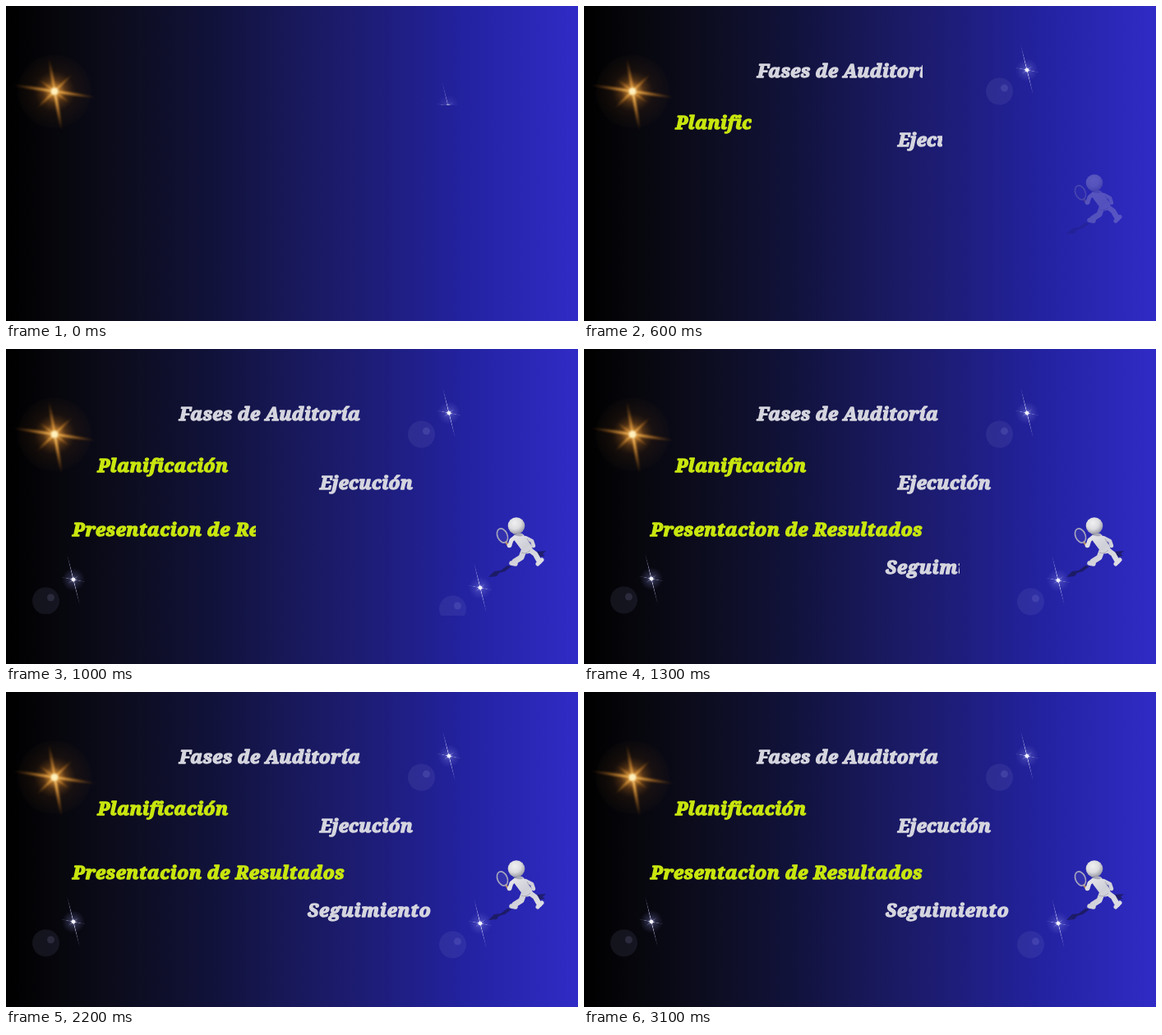
Recreate the animation shown at these times as an HTML page without scripts. Size 696x384 px, loop 5 s.

```html
<!DOCTYPE html>
<html lang="es">
<head>
<meta charset="utf-8">
<title>Fases de Auditoría</title>
<style>
  html, body { margin: 0; width: 100%; height: 100%; overflow: hidden; background: #000; }
  svg { display: block; width: 100vw; height: 100vh; }
  text {
    font: italic 700 22.5px "Noto Serif", "Liberation Serif", serif;
    stroke-width: 1.5; stroke-linejoin: round;
  }
  .pale { fill: #d5d5df; stroke: #d5d5df; }
  .lime { fill: #c9e60f; stroke: #c9e60f; }
  .limb { fill: none; stroke: url(#skin); stroke-linecap: round; stroke-linejoin: round; }
</style>
</head>
<body>
<svg viewBox="0 0 696 384" preserveAspectRatio="none">
  <defs>
    <linearGradient id="night">
      <stop offset="0" stop-color="#000"/>
      <stop offset=".1" stop-color="#07070e"/>
      <stop offset=".22" stop-color="#0d0d21"/>
      <stop offset=".36" stop-color="#11123a"/>
      <stop offset=".5" stop-color="#18185a"/>
      <stop offset=".65" stop-color="#1e1d7a"/>
      <stop offset=".8" stop-color="#2322a0"/>
      <stop offset="1" stop-color="#302bc6"/>
    </linearGradient>
    <radialGradient id="gold">
      <stop offset="0" stop-color="#ffe9a8"/>
      <stop offset=".2" stop-color="#f5b650" stop-opacity=".95"/>
      <stop offset=".55" stop-color="#b87426" stop-opacity=".65"/>
      <stop offset="1" stop-color="#6a3c10" stop-opacity="0"/>
    </radialGradient>
    <radialGradient id="goldGlow">
      <stop offset="0" stop-color="#ffce70"/>
      <stop offset=".12" stop-color="#e89a3c" stop-opacity=".8"/>
      <stop offset=".3" stop-color="#a8641f" stop-opacity=".45"/>
      <stop offset=".55" stop-color="#5c3614" stop-opacity=".2"/>
      <stop offset=".93" stop-color="#3c2614" stop-opacity=".1"/>
      <stop offset="1" stop-color="#3c2614" stop-opacity="0"/>
    </radialGradient>
    <radialGradient id="halo">
      <stop offset="0" stop-color="#d8dcff" stop-opacity=".6"/>
      <stop offset=".35" stop-color="#9a9cf0" stop-opacity=".22"/>
      <stop offset="1" stop-color="#8888e0" stop-opacity="0"/>
    </radialGradient>
    <radialGradient id="beam">
      <stop offset="0" stop-color="#fff"/>
      <stop offset=".4" stop-color="#dcdcff" stop-opacity=".55"/>
      <stop offset="1" stop-color="#b8b8f0" stop-opacity=".1"/>
    </radialGradient>
    <radialGradient id="ball" cx=".4" cy=".33" r=".68">
      <stop offset="0" stop-color="#f0f0f2"/>
      <stop offset=".55" stop-color="#dcdce0"/>
      <stop offset="1" stop-color="#9898a6"/>
    </radialGradient>
    <linearGradient id="skin" gradientUnits="userSpaceOnUse" x1="612" y1="230" x2="640" y2="262">
      <stop offset="0" stop-color="#e6e6ea"/>
      <stop offset=".5" stop-color="#cfcfd8"/>
      <stop offset="1" stop-color="#dcdce2"/>
    </linearGradient>
    <filter id="soft" x="-50%" y="-50%" width="200%" height="200%"><feGaussianBlur stdDeviation=".9"/></filter>

    <g id="flare">
      <circle cx="-33.5" cy="26" r="16.5" fill="#9a98d8" opacity=".1"/>
      <circle cx="-27.5" cy="22" r="4.5" fill="#b0b0f0" opacity=".14"/>
      <circle r="14" fill="url(#halo)"/>
      <g fill="url(#beam)">
        <ellipse rx="31" ry=".7" transform="rotate(76)"/>
        <ellipse rx="15" ry=".55" transform="rotate(11)"/>
        <ellipse rx="8" ry=".5" transform="rotate(-38)"/>
      </g>
      <circle r="2.3" fill="#f4f4ff"/>
    </g>
    <clipPath id="tray"><rect x="-60" y="-40" width="100" height="83"/></clipPath>

    <!-- left-to-right text wipes -->
    <clipPath id="wipe1"><rect x="205" y="60" width="0" height="40">
      <animate attributeName="width" dur="5s" repeatCount="indefinite" calcMode="discrete"
        keyTimes="0;.04;.06;.08;.1;.12;.14" values="0;33;76;120;163;207;260"/>
    </rect></clipPath>
    <clipPath id="wipe2"><rect x="105" y="122" width="0" height="40">
      <animate attributeName="width" dur="5s" repeatCount="indefinite" calcMode="discrete"
        keyTimes="0;.08;.1;.12;.14;.16" values="0;36;68;99;131;200"/>
    </rect></clipPath>
    <clipPath id="wipe3"><rect x="376" y="143" width="0" height="40">
      <animate attributeName="width" dur="5s" repeatCount="indefinite" calcMode="discrete"
        keyTimes="0;.1;.12;.14;.16;.18" values="0;32;60;88;115;160"/>
    </rect></clipPath>
    <clipPath id="wipe4"><rect x="75" y="200" width="0" height="40">
      <animate attributeName="width" dur="5s" repeatCount="indefinite" calcMode="discrete"
        keyTimes="0;.14;.16;.18;.2;.22;.24" values="0;32;98;163;229;295;370"/>
    </rect></clipPath>
    <clipPath id="wipe5"><rect x="361" y="246" width="0" height="40">
      <animate attributeName="width" dur="5s" repeatCount="indefinite" calcMode="discrete"
        keyTimes="0;.22;.24;.26;.28;.3" values="0;35;66;96;127;190"/>
    </rect></clipPath>
  </defs>

  <rect width="696" height="384" fill="url(#night)"/>

  <g transform="translate(59 104)">
    <circle r="46" fill="url(#goldGlow)"/>
    <g fill="url(#gold)" filter="url(#soft)">
      <ellipse rx="46" ry="3.2" transform="translate(1 4) rotate(80)"/>
      <ellipse rx="52" ry="3" transform="rotate(8.5)"/>
      <ellipse rx="30" ry="2.8" transform="rotate(-44)"/>
      <ellipse rx="24" ry="2.4" transform="rotate(38)"/>
    </g>
    <circle r="4.5" fill="#fff0bc" filter="url(#soft)"/>
  </g>

  <!-- sparkles rise inside their trays -->
  <g transform="translate(539 78)" clip-path="url(#tray)"><g>
    <animateTransform attributeName="transform" type="translate" dur="5s" repeatCount="indefinite" calcMode="discrete"
      keyTimes="0;.02;.04;.06;.08" values="-1 44;0 25;0 8;0 1;0 0"/>
    <animate attributeName="opacity" dur="5s" repeatCount="indefinite" calcMode="discrete"
      keyTimes="0;.02;.04" values=".6;.85;1"/>
    <use href="#flare"/>
  </g></g>
  <g transform="translate(82 280)" clip-path="url(#tray)"><g>
    <animateTransform attributeName="transform" type="translate" dur="5s" repeatCount="indefinite" calcMode="discrete"
      keyTimes="0;.14;.16;.18;.2;.22" values="0 90;0 46;0 25;0 8;0 1;0 0"/>
    <use href="#flare"/>
  </g></g>
  <g transform="translate(577 282)" clip-path="url(#tray)"><g>
    <animateTransform attributeName="transform" type="translate" dur="5s" repeatCount="indefinite" calcMode="discrete"
      keyTimes="0;.18;.2;.22;.24" values="0 90;0 30;0 9;0 2;0 0"/>
    <use href="#flare"/>
  </g></g>

  <g>
    <animate attributeName="opacity" dur="5s" repeatCount="indefinite" calcMode="discrete"
      keyTimes="0;.12;.14;.16;.18;.2" values="0;.25;.55;.82;.95;1"/>
    <g fill="#1a1850">
      <path d="M587 278L594 271L602 270L610 264L615 265L607 271L600 273L597 277Z" opacity=".75"/>
      <path d="M640 252L646 247L657 246L653 250L656 252L647 254Z" opacity=".7">
        <animate attributeName="opacity" dur="5s" repeatCount="indefinite" calcMode="discrete"
          keyTimes="0;.18;.2" values="0;.4;.7"/>
      </path>
    </g>
    <g class="limb">
      <path d="M636 244L644 250L649 259" stroke-width="6.5"/>
      <path d="M647 262L652 257" stroke-width="5"/>
      <path d="M630 246L627 254L619 259" stroke-width="7"/>
      <path d="M620 262L615 261" stroke-width="5.5"/>
      <path d="M632 230L640 234L642 240" stroke-width="4.5"/>
      <path d="M625 231L634 243" stroke-width="13"/>
      <path d="M620 229L615 233L613 239" stroke-width="5"/>
    </g>
    <path d="M627 248Q633 251 638 245M634 231L638 238" fill="none" stroke="#9898a8" opacity=".7"/>
    <ellipse cx="623" cy="226" rx="6" ry="2" fill="#8e8ea0" opacity=".65" transform="rotate(10 623 226)"/>
    <circle cx="621" cy="215.5" r="10.3" fill="url(#ball)"/>
    <path d="M608 235L612 241" stroke="#b98a5c" stroke-width="2.4" stroke-linecap="round"/>
    <ellipse cx="604" cy="227.5" rx="6" ry="9" transform="rotate(-24 604 227.5)" fill="#4744b0" fill-opacity=".4" stroke="#a6a6bc" stroke-width="1.6"/>
    <circle cx="612.5" cy="239.5" r="2.8" fill="#e0e0e6"/>
  </g>

  <g clip-path="url(#wipe1)"><text class="pale" x="210.8" y="87.3" letter-spacing=".3">Fases de Auditoría</text></g>
  <g clip-path="url(#wipe2)"><text class="lime" x="111.5" y="149.8" letter-spacing=".4">Planificación</text></g>
  <g clip-path="url(#wipe3)"><text class="pale" x="382" y="171" letter-spacing=".4">Ejecución</text></g>
  <g clip-path="url(#wipe4)"><text class="lime" x="81" y="227.8" letter-spacing=".55">Presentacion de Resultados</text></g>
  <g clip-path="url(#wipe5)"><text class="pale" x="367" y="274.4" letter-spacing=".8">Seguimiento</text></g>
</svg>
</body>
</html>
```
